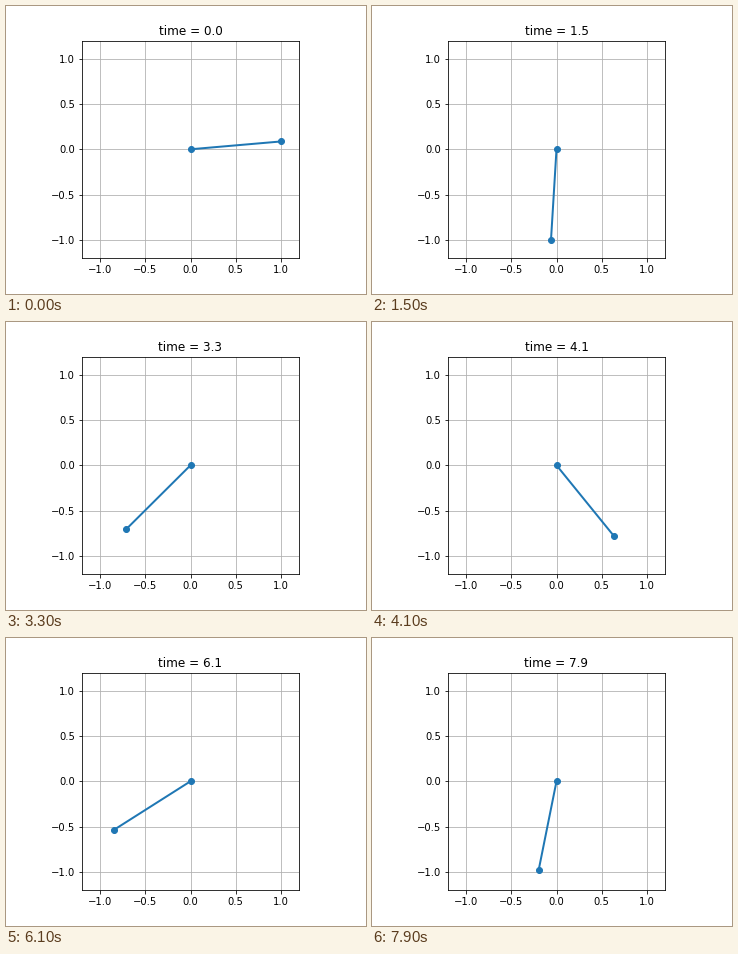
Recreate the animation shown at these times as a matplotlib script. Size 360 by 288 pixels, loop 8 s.

```python
import numpy as np
import matplotlib.pyplot as plt
from matplotlib.animation import FuncAnimation

FRAMES, STEP_MS = 80, 100
DRAG = 0.08  # swings start briskly and end a little slower

# Turning points: time (s) and angle from straight down (deg)
TURNS = [(-0.167, 106), (0.935, -66), (2.278, 84.8), (3.44, -49.2),
         (4.713, 106), (5.92, -70), (7.06, 108), (8.427, -60)]


def angle(t):
    """Angle in radians: a skewed half cosine from turn to turn."""
    for (t0, a0), (t1, a1) in zip(TURNS, TURNS[1:]):
        if t < t1:
            break
    phase = np.pi * (t - t0) / (t1 - t0)
    phase += DRAG * np.sin(phase)
    return np.radians(a0 + (a1 - a0) * (1 - np.cos(phase)) / 2)


plt.rcParams.update({"font.family": "DejaVu Sans", "font.size": 10})
fig, ax = plt.subplots(figsize=(5, 4), dpi=72, facecolor="white")
fig.subplots_adjust(left=0.125, right=0.9, bottom=0.125, top=0.88)
ax.set_aspect("equal")
ax.set(xlim=(-1.2, 1.2), ylim=(-1.2, 1.2))
ticks = np.arange(-1, 1.1, 0.5)
ax.set_xticks(ticks)
ax.set_yticks(ticks)
ax.grid()

rod, = ax.plot([], [], "o-", lw=2)
title = ax.set_title("time = 0.0")


def draw(i):
    t = i * STEP_MS / 1000
    a = angle(t)
    rod.set_data([0, np.sin(a)], [0, -np.cos(a)])
    title.set_text(f"time = {t:.1f}")
    return rod, title


anim = FuncAnimation(fig, draw, frames=FRAMES, interval=STEP_MS,
                     repeat=True, repeat_delay=0, blit=False)
plt.show()
```
